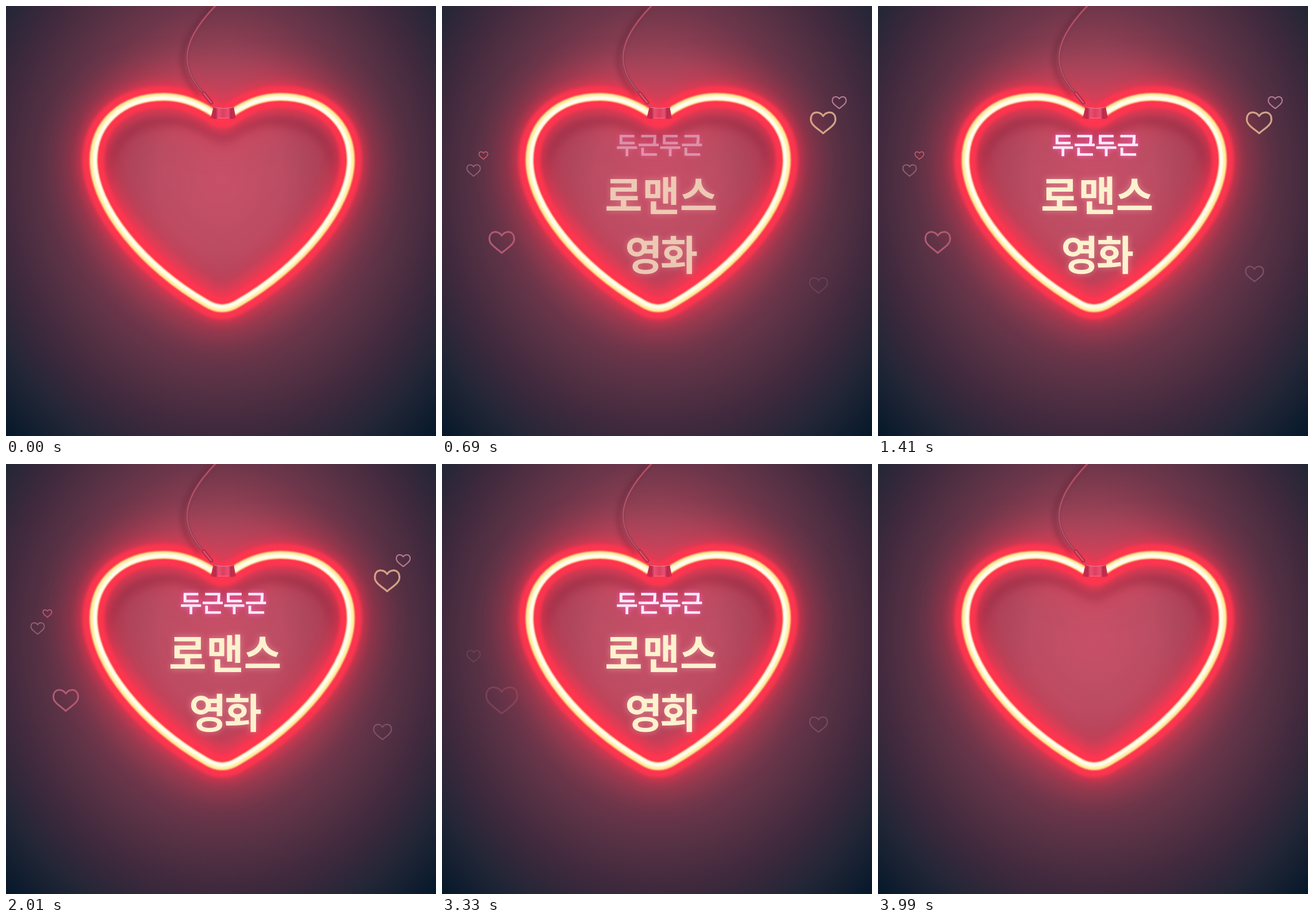
An HTML page with a canvas that plays this animation: 748 px wide and 748 px high, repeating every 4020 ms.

```html
<!DOCTYPE html>
<html lang="ko">
<head>
<meta charset="utf-8">
<style>
html, body { margin: 0; width: 100%; height: 100%; overflow: hidden; background: #3a2a3c; }
canvas { display: block; width: 100vw; height: 100vh; }
</style>
</head>
<body>
<canvas id="stage" width="748" height="748"></canvas>
<script>
const SIZE = 748, LOOP = 4020, STEP = 30;
const FONT = '"Noto Sans CJK KR", "Noto Sans CJK", "Noto Sans CJK JP", sans-serif';
const ctx = document.getElementById('stage').getContext('2d');

const clamp = v => Math.min(1, Math.max(0, v));
const span = (t, [a, b]) => clamp((t - a) / (b - a));

// Piecewise linear value from [time, value] pairs
function track(keys, t) {
  let [t0, v0] = keys[0];
  for (const [t1, v1] of keys) {
    if (t < t1) return v0 + (v1 - v0) * clamp((t - t0) / (t1 - t0 || 1));
    [t0, v0] = [t1, v1];
  }
  return v0;
}

function makeLayer() {
  const c = document.createElement('canvas');
  c.width = c.height = SIZE;
  return c;
}

// The tube is open at the clip, the glow runs all the way round
const outline = `M359 185 C331 167 305 158 275 158 C200 158 152 205 152 268
  C152 350 240 455 348 517 Q376 535 404 517 C512 455 600 350 600 268
  C600 205 552 158 477 158 C447 158 421 167 395 185`;
const tube = new Path2D(outline);
const sign = new Path2D(outline + ' Q376 200 359 185 Z');

function strokePath(g, path, width, color, blur = 0, scale = 1, dy = 0) {
  g.save();
  g.filter = blur ? `blur(${blur}px)` : 'none';
  g.translate(376, 310 + dy);
  g.scale(scale, scale);
  g.translate(-376, -310);
  g.lineWidth = width;
  g.lineJoin = g.lineCap = 'round';
  g.strokeStyle = color;
  g.stroke(path);
  g.restore();
}

function paintWall(g) {
  const stops = [[0, '#c85068'], [110, '#bb4d63'], [180, '#9e4459'], [220, '#853c50'],
    [261, '#6e364a'], [316, '#573144'], [380, '#40293d'], [456, '#222636'], [540, '#05182a']];
  const grad = g.createRadialGradient(0, 0, 0, 0, 0, 540);
  for (const [r, c] of stops) grad.addColorStop(r / 540, c);
  g.save();
  g.translate(374, 300);
  g.scale(1, 1.15);
  g.fillStyle = grad;
  g.fillRect(-400, -400, 800, 800);
  g.restore();
}

function paintSign(g) {
  strokePath(g, sign, 68, 'rgba(255,48,78,.52)', 32);

  // soft shadow on the wall inside the tube
  const fade = g.createLinearGradient(0, 170, 0, 330);
  fade.addColorStop(0, 'rgba(120,28,52,.45)');
  fade.addColorStop(1, 'rgba(120,28,52,0)');
  g.save();
  g.clip(sign);
  strokePath(g, sign, 18, fade, 9, 0.89, 24);
  // the lower walls catch more light
  const lift = g.createLinearGradient(0, 260, 0, 400);
  lift.addColorStop(0, 'rgba(255,62,88,0)');
  lift.addColorStop(1, 'rgba(255,62,88,.6)');
  strokePath(g, sign, 64, lift, 11);
  g.restore();

  strokePath(g, sign, 48, 'rgba(255,50,78,.55)', 9);
  strokePath(g, sign, 38, 'rgba(255,54,80,.92)', 2.5);
  strokePath(g, tube, 14, '#ff9a60', 1.2);
  strokePath(g, tube, 11.5, '#fff0a0', 0.8);
  strokePath(g, tube, 6.5, '#fffdf4', 1.4, 0.988);
}

function paintCable(g) {
  const cable = new Path2D('M364 0 C335 30 315 60 315 90 C315 115 328 135 344 152');
  const plug = new Path2D('M344 152 L357 168');
  const tail = new Path2D('M356 167 L370 177');
  g.save();
  g.translate(-8, 3);
  strokePath(g, cable, 7, 'rgba(70,22,42,.3)', 4);
  g.restore();
  strokePath(g, cable, 4, '#8f3c50');
  strokePath(g, cable, 1.6, '#bd586e');
  strokePath(g, tail, 3, '#d84560');
  strokePath(g, plug, 7, '#b52f4b');
  strokePath(g, plug, 2, '#df5a72');

  const body = new Path2D('M361 175 Q378 179 396 175 L400 195 Q390 198 386 195 H370 Q366 198 356 195 Z');
  const sheen = g.createLinearGradient(356, 0, 400, 0);
  for (const [p, c] of [[0, '#cf2e50'], [.2, '#b92a4b'], [.3, '#e85272'],
    [.5, '#de3e60'], [.7, '#e85272'], [.8, '#b92a4b'], [1, '#cf2e50']]) sheen.addColorStop(p, c);
  g.fillStyle = sheen;
  g.fill(body);
  strokePath(g, new Path2D('M362 176 Q378 180 395 176 M369 195 H387'), 1.2, '#f47a90');
}

// Places text so that its ink is centred on (x, y)
function inkText(g, { text, size, weight, x, y, gap = 0, edge = 0 }) {
  g.font = `${weight} ${size}px ${FONT}`;
  g.letterSpacing = `${gap}px`;
  const m = g.measureText(text);
  const left = x + (m.actualBoundingBoxLeft - m.actualBoundingBoxRight) / 2;
  const base = y + (m.actualBoundingBoxAscent - m.actualBoundingBoxDescent) / 2;
  g.fillText(text, left, base);
  if (!edge) return;
  g.lineWidth = edge;
  g.strokeText(text, left, base);
}

function paintText(lines, color, glow, blur) {
  const layer = makeLayer(), g = layer.getContext('2d');
  g.fillStyle = g.strokeStyle = color;
  g.shadowColor = glow;
  g.shadowBlur = blur;
  for (const line of lines) inkText(g, line);
  return layer;
}

const wall = makeLayer();
const wg = wall.getContext('2d');
paintWall(wg);
paintSign(wg);
paintCable(wg);

const title = paintText([
  { text: '로맨스', size: 71, weight: 700, x: 381, y: 328.5 },
  { text: '영화', size: 71, weight: 700, x: 382.5, y: 433, gap: -4 }
], '#fdf2cf', 'rgba(255,190,190,.5)', 12);
const beat = paintText([
  { text: '두근두근', size: 41, weight: 400, x: 378.5, y: 242.5, edge: 1.3 }
], '#fffaff', 'rgba(255,110,215,.7)', 10);

// One slow flash, then on; the small line runs slightly ahead
const titleKeys = [[240, 0], [600, 1], [960, 0], [1380, 1], [3420, 1], [3750, 0]];
const beatKeys = [[120, 0], [480, 1], [860, 0], [1360, 1], [3420, 1], [3750, 0]];

// rise/fall: vertical offset before entering and after leaving; grow: extra scale
const hearts = [
  { x: 55, y: 286, w: 25, lw: 1.8, color: '#956273', enter: [300, 630], leave: [3150, 3430], rise: -75, fall: 75 },
  { x: 72, y: 260, w: 17, lw: 1.7, color: '#bd5a70', enter: [210, 540], leave: [3060, 3345], rise: -75, fall: 75 },
  { x: 104, y: 411, w: 46, lw: 3, color: '#b25a73', enter: [300, 600], leave: [3150, 3430], grow: .39 },
  { x: 655, y: 466, w: 33, lw: 2.1, color: '#80536a', enter: [540, 850], leave: [3270, 3620], rise: 75, fall: -75 },
  { x: 663, y: 203, w: 46, lw: 3.2, color: '#d2a388', enter: [330, 630], leave: [2790, 3090] },
  { x: 691, y: 168, w: 26, lw: 2, color: '#b87b98', enter: [210, 540], leave: [2850, 3150] }
];

function drawHeart(h, t) {
  const a = span(t, h.enter), b = span(t, h.leave);
  if (!a || b === 1) return;
  const away = (1 - a) ** 2;
  const s = (h.w - h.lw) * (1 + (h.grow || 0) * (away + b));
  ctx.save();
  ctx.globalAlpha = a * (1 - b);
  ctx.translate(h.x, h.y + (h.rise || 0) * away + (h.fall || 0) * b);
  ctx.beginPath();
  for (const k of [-1, 1]) {
    const p = (x, y) => [x * s * k, y * s];
    ctx.moveTo(0, -.27 * s);
    ctx.bezierCurveTo(...p(.11, -.47), ...p(.5, -.51), ...p(.5, -.13));
    ctx.bezierCurveTo(...p(.5, .08), ...p(.25, .22), ...p(0, .43));
  }
  ctx.lineWidth = h.lw;
  ctx.lineCap = ctx.lineJoin = 'round';
  ctx.strokeStyle = h.color;
  ctx.stroke();
  ctx.restore();
}

function drawLayer(layer, alpha) {
  ctx.globalAlpha = alpha;
  ctx.drawImage(layer, 0, 0);
  ctx.globalAlpha = 1;
}

const start = performance.now();
function tick() {
  const t = Math.floor((performance.now() - start) % LOOP / STEP) * STEP;
  drawLayer(wall, 1);
  for (const h of hearts) drawHeart(h, t);
  drawLayer(title, track(titleKeys, t));
  drawLayer(beat, track(beatKeys, t));
  requestAnimationFrame(tick);
}
tick();
</script>
</body>
</html>
```
